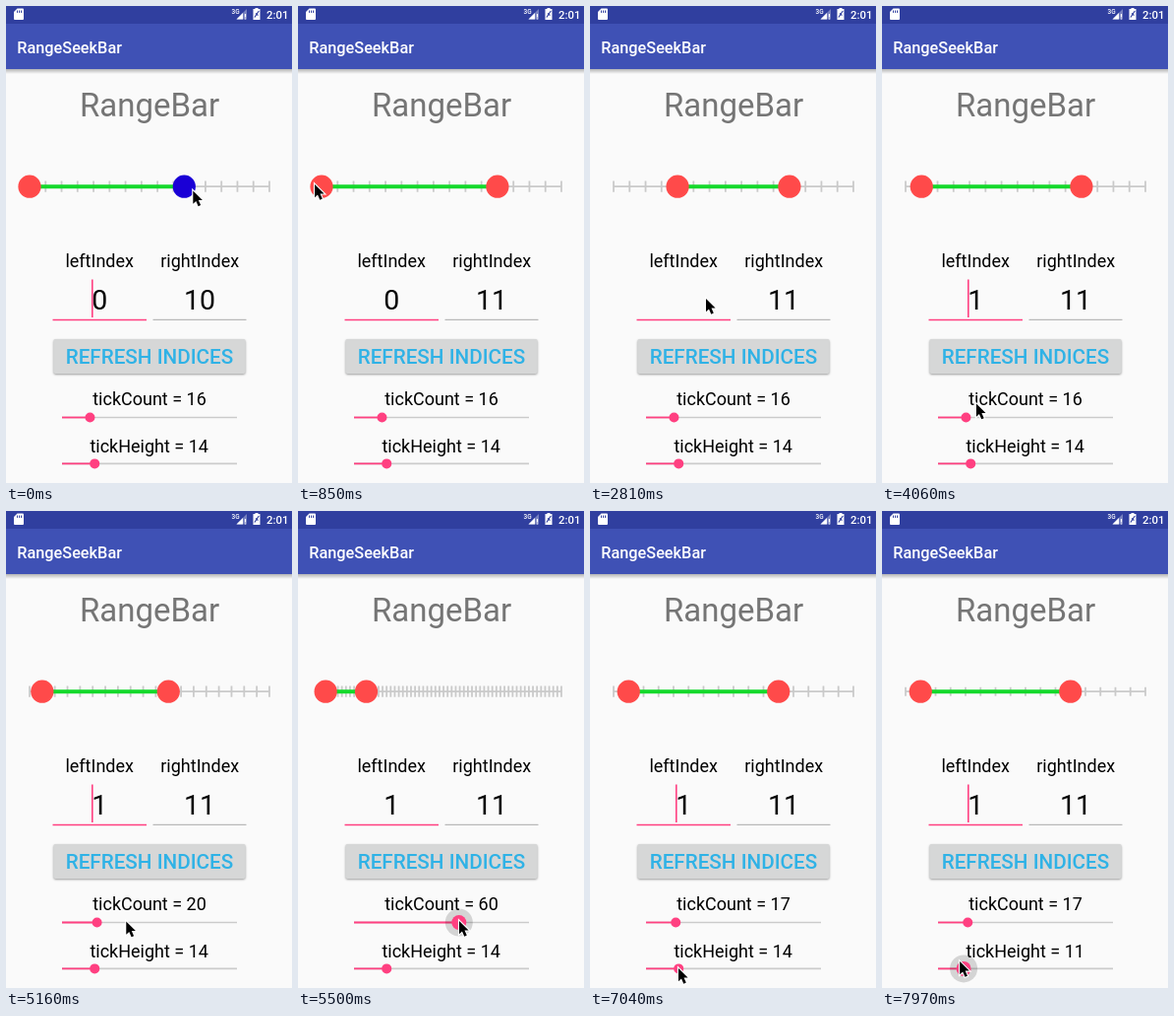
Animation of 291 by 484 pixels, one loop 8000 ms. Source, as an HTML page:

```html
<!DOCTYPE html>
<html lang="en">
<head>
<meta charset="utf-8">
<title>RangeSeekBar</title>
<style>
html, body { margin: 0; width: 100%; height: 100%; overflow: hidden; background: #fafafa; }
svg { display: block; width: 291px; height: 484px; }
text { font-family: Roboto, sans-serif; fill: #000; }
.mid { text-anchor: middle; }
.label { font-size: 18px; }
.num { font-size: 28.5px; }
.med { font-weight: 500; }
.white { fill: #fff; }
</style>
</head>
<body>
<svg viewBox="0 0 291 484">
  <defs>
    <linearGradient id="shade" x2="0" y2="1">
      <stop offset="0" stop-color="#000" stop-opacity=".28"/>
      <stop offset="1" stop-color="#000" stop-opacity="0"/>
    </linearGradient>
    <filter id="soft" x="-5%" y="-20%" width="110%" height="150%"><feGaussianBlur stdDeviation="1"/></filter>
  </defs>
  <rect width="291" height="484" fill="#fafafa"/>
  <rect y="64" width="291" height="5" fill="url(#shade)"/>
  <rect width="291" height="64" fill="#3f51b5"/>
  <rect width="291" height="18" fill="#303f9f"/>

  <g fill="#fff">
    <path d="M11.5 2.5H17a1 1 0 0 1 1 1V13a1 1 0 0 1-1 1H9a1 1 0 0 1-1-1V6z"/>
    <path d="M11.5 4.500v2.400M13.500 4.500v2.400M15.500 4.500v2.400" stroke="#303f9f"/>
    <path d="M245 3v10.500H234.500z" fill-opacity=".35"/>
    <path d="M241 7v6.500H234.500z"/>
    <path d="M243.500 8v3.500M243.500 12.500v1" stroke="#fff" stroke-width="1.200"/>
    <path d="M253.500 3V2h3v1h2v11h-7V3z"/>
    <path d="M257.300 5l-4.400 6.500M254 7.500l2.500 2" stroke="#303f9f" stroke-width="1.200"/>
  </g>
  <text x="229.500" y="7.500" class="med white" font-size="6.500">3G</text>
  <text x="265" y="12.700" class="med white" font-size="11.400">2:01</text>
  <text x="11.300" y="47.500" class="med white" font-size="16.300">RangeSeekBar</text>
  <text x="146" y="112" class="mid" font-size="33" style="fill:#757575">RangeBar</text>

  <path id="ticks" fill="none" stroke="#cacaca" stroke-width="1.800"/>
  <path id="span" stroke="#14d92b" stroke-width="4"/>
  <circle id="leftThumb" cy="183.200" r="11.600"/>
  <circle id="rightThumb" cy="183.200" r="11.600"/>

  <text x="95.200" y="264.500" class="mid label">leftIndex</text>
  <text x="197.200" y="264.500" class="mid label">rightIndex</text>
  <text id="leftText" x="95.300" y="308" class="mid num"></text>
  <text id="rightText" x="197" y="308" class="mid num"></text>
  <path d="M47.500 318.500H143" stroke="#ff4081" stroke-width="1.700"/>
  <path d="M149.500 318.300H244.500" stroke="#a8a8a8"/>
  <rect id="caret" y="277.500" width="1.600" height="38.500" fill="#ff4081"/>
  <path id="handle" d="M103.500 318l5.600 4.300a8 8 0 1 1-11.200 0z" fill="#ff4081"/>

  <rect x="48.500" y="339" width="195" height="35" rx="2" opacity=".38" filter="url(#soft)"/>
  <rect id="button" x="48.300" y="338" width="195.400" height="35" rx="2"/>
  <text x="146" y="363.200" class="mid med" font-size="20.700" style="fill:#2fb2e6">REFRESH INDICES</text>

  <text id="countText" x="146" y="405" class="mid label"></text>
  <text id="heightText" x="145.700" y="452.500" class="mid label"></text>
  <g id="countBar"></g>
  <g id="heightBar"></g>

  <path id="cursor" d="M0 0V13.200L3 10.500L5.300 15.700L7.800 14.600L5.500 9.500H9.600Z" stroke="#fff" stroke-width="2.200" paint-order="stroke"/>
</svg>
<script>
const LOOP = 8000, LAG = 30, BLINK = 472;
const X0 = 24, X1 = 268, BAR_Y = 183.2;
const S0 = 57, S1 = 235, COUNT_STEP = 1.78, HEIGHT_STEP = 2.373;
const $ = id => document.getElementById(id);
const set = (el, attrs) => { for (const k in attrs) el.setAttribute(k, attrs[k]); };
const put = (id, s) => { if ($(id).textContent !== s) $(id).textContent = s; };
const clamp = (v, a, b) => Math.min(b, Math.max(a, v));
const ramp = (t, a, b) => clamp((t - a) / (b - a), 0, 1);
const ease = k => k * k * (3 - 2 * k);

// pointer moves: start, end, to x, to y
const moves = [
  [-60, 60, 203, 187],
  [270, 770, 17, 181],     // to the left thumb
  [890, 1240, 90, 186],    // drag it
  [1260, 1560, 118, 297],  // to the left field
  [3100, 3440, 132, 366],  // to the button
  [3800, 4180, 85, 415],   // to the count slider
  [4250, 4500, 93, 417],
  [4980, 5390, 164, 416],
  [5500, 5955, 87, 414],
  [6390, 6890, 90, 464],   // to the height slider
  [7060, 7420, 180, 465],
  [7540, 8000, 78, 457]
];

function pointer(t) {
  let x = 177, y = 188;
  for (const [a, b, toX, toY] of moves) {
    const k = ease(ramp(t, a, b));
    x += (toX - x) * k;
    y += (toY - y) * k;
  }
  return [x, y];
}

const dragX = t => pointer(t - LAG)[0];
const valueAt = (t, step) => Math.round((dragX(t) - S0) / step);

function tickCount(t) {
  if (t < 4250) return 16;
  if (t > 4540 && t < 5180) return 20;
  return t < 6000 ? valueAt(t, COUNT_STEP) : 17;
}

const tickHeight = t => t < 7090 ? 14 : valueAt(t, HEIGHT_STEP);

// edits of the left field: time, caret x; each restarts the blinking
const edits = [[-80, 87], [1800, 102.5], [2280, 94.5], [2920, 102.5], [3760, 87]];

function drawCaret(t) {
  const [start, x] = edits.filter(e => e[0] <= t).pop();
  set($("caret"), { x, opacity: Math.floor((t - start) / BLINK) % 2 ? 0 : 1 });
}

function leftText(t, dragIndex) {
  if (t < 1250) return String(dragIndex);
  if (t < 2280) return "4";
  return t < 2920 ? "" : "1";
}

// press strength, 0 to 1
const pressed = (t, on, off) => ramp(t, on, on + 60) * (1 - ramp(t, off, off + 170));

function makeSlider(id, y) {
  $(id).innerHTML = `<path d="M${S0} ${y}H${S1}" stroke="#cbcbcb" stroke-width="1.7"/>
    <path stroke="#ff4081" stroke-width="1.8"/>
    <circle cy="${y}" r="14"/><circle cy="${y}" fill="#ff4081"/>`;
  const [, line, halo, knob] = $(id).children;
  return (x, press) => {
    set(line, { d: `M${S0} ${y}H${x}` });
    set(halo, { cx: x, "fill-opacity": 0.15 * press });
    set(knob, { cx: x, r: 5 + 2.5 * press });
  };
}
const countBar = makeSlider("countBar", 417.5);
const heightBar = makeSlider("heightBar", 464.4);

function drawRange(t, n, h) {
  const gap = (X1 - X0) / (n - 1), half = h * 0.405;
  const leftDrag = t >= 880 && t < 1250, rightDrag = t < 260;
  const snapped = X0 + gap * (t < 880 ? 0 : t < 3760 ? 4 : 1);
  const left = leftDrag ? clamp(dragX(t), X0, X1) : snapped;
  const right = rightDrag ? dragX(t) : X0 + gap * 11;

  let d = `M${X0} ${BAR_Y}H${X1}`;
  for (let i = 0; i < n; i++) d += `M${X0 + i * gap} ${BAR_Y - half}v${2 * half}`;
  set($("ticks"), { d });
  set($("span"), { d: `M${left} ${BAR_Y}H${right}` });
  const tint = on => on ? "#1a00d6" : "#ff4a4a";
  set($("leftThumb"), { cx: left, fill: tint(leftDrag) });
  set($("rightThumb"), { cx: right, fill: tint(rightDrag) });
  put("leftText", leftText(t, Math.round((left - X0) / gap)));
  put("rightText", String(Math.round((right - X0) / gap)));
}

function draw(t) {
  const n = tickCount(t), h = tickHeight(t);
  drawRange(t, n, h);
  drawCaret(t);
  put("countText", "tickCount = " + n);
  put("heightText", "tickHeight = " + h);

  set($("handle"), { opacity: ramp(t, 1770, 1900) * (1 - ramp(t, 2280, 2460)) });
  const grey = Math.round(214 - 18 * pressed(t, 3730, 3840));
  set($("button"), { fill: `rgb(${grey},${grey + 1},${grey + 1})` });

  countBar(S0 + n * COUNT_STEP, pressed(t, 4240, 4540) + pressed(t, 5180, 6390));
  heightBar(S0 + h * HEIGHT_STEP, pressed(t, 7090, LOOP));
  set($("cursor"), { transform: `translate(${pointer(t).join(" ")})` });
}

function frame() {
  draw(performance.now() % LOOP);
  requestAnimationFrame(frame);
}
frame();
</script>
</body>
</html>
```
